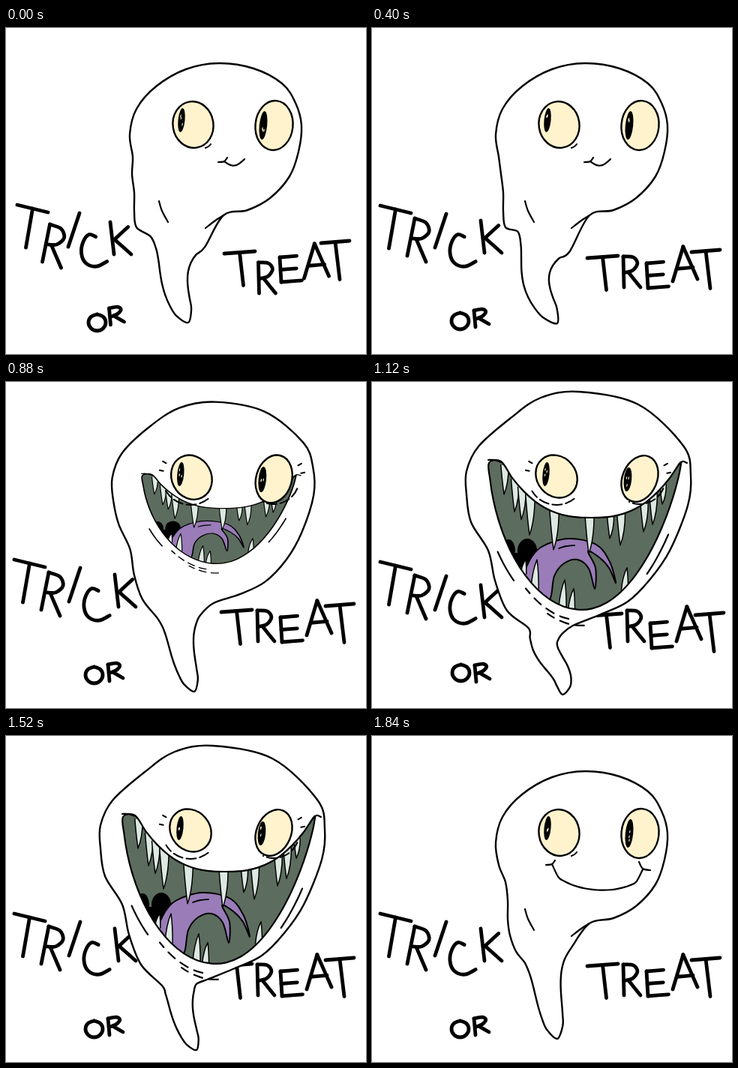
Animation of 480 by 435 pixels, one loop 1.92 s. Source, as an HTML page with a canvas:

```html
<!DOCTYPE html>
<html>
<head>
<meta charset="utf-8">
<title>Trick or treat</title>
<style>
html, body { margin: 0; width: 100%; height: 100%; overflow: hidden; background: #fff; }
canvas { display: block; }
</style>
</head>
<body>
<canvas id="stage" width="480" height="435"></canvas>
<script>
const ctx = document.getElementById('stage').getContext('2d');
const STEP = 80, COUNT = 24, PI = Math.PI;
const INK = '#000', CREAM = '#fff3cd', GUM = '#5c6c5e', PURPLE = '#9a7cb8', TOOTH = '#dde8e2';

const clamp = (v, lo, hi) => Math.max(lo, Math.min(hi, v));
const lerp = (a, b, k) => a + (b - a) * k;
const blend = (a, b, k) => a.map((v, i) => lerp(v, b[i], k));
const range = (n, fn) => Array.from({ length: n + 1 }, (_, i) => fn(i / n, i));
const noise = n => {
  const v = Math.sin(n * 91.7 + 3.1) * 4373.3;
  return v - Math.floor(v) - 0.5;
};
// "x y x y / x y ..." -> list of point lists
const strokes = s => s.split('/').map(part => {
  const n = part.trim().split(/\s+/).map(Number);
  return range(n.length / 2 - 1, (_, i) => [n[2 * i], n[2 * i + 1]]);
});

// Smooth curve through all points
function trace(p, closed) {
  const n = p.length;
  const at = i => closed ? p[(i + n) % n] : p[clamp(i, 0, n - 1)];
  ctx.beginPath();
  ctx.moveTo(...p[0]);
  for (let i = 0; i < (closed ? n : n - 1); i++) {
    const a = at(i - 1), b = at(i), c = at(i + 1), d = at(i + 2);
    ctx.bezierCurveTo(b[0] + (c[0] - a[0]) / 6, b[1] + (c[1] - a[1]) / 6,
      c[0] - (d[0] - b[0]) / 6, c[1] - (d[1] - b[1]) / 6, ...c);
  }
  if (closed) ctx.closePath();
}
function paint(fill, width) {
  if (fill) {
    ctx.fillStyle = fill;
    ctx.fill();
  }
  if (width) {
    ctx.lineWidth = width;
    ctx.stroke();
  }
}
function line(p, width = 2.2) {
  trace(p);
  paint(null, width);
}
function shape(p, fill, width = 2.4) {
  trace(p, true);
  paint(fill, width);
}
function oval(x, y, rx, ry, turn, fill, width) {
  ctx.beginPath();
  ctx.ellipse(x, y, rx, ry, turn, 0, PI * 2);
  paint(fill, width);
}

// Stroke letters in a unit box
const glyphs = {
  T: '0 0 1 0/.5 0 .5 1',
  R: '0 0 0 1/0 0 .6 .02 .85 .22 .55 .45 .1 .52/.3 .52 1 1',
  I: '0 0 0 1',
  C: '.55 .15 .3 .08 .08 .3 .02 .65 .2 .95 .6 1.05 1 .9',
  K: '0 0 0 1/1 .15 .1 .55/.15 .55 1 1',
  O: '.5 0 .15 .15 0 .5 .15 .85 .5 1 .85 .85 1 .5 .85 .15 .5 0',
  E: '0 0 0 1/0 0 .9 0/0 .5 .85 .5/0 1 1.1 1',
  A: '0 1 .42 0/.42 0 1 1/.18 .64 .82 .64'
};
for (const k in glyphs) glyphs[k] = strokes(glyphs[k]);

// Each letter: x, y, width, height, rise, slant; lifts and push move them in the other two drawings
const words = [
  { text: 'TRICK', push: 0, lifts: [[-1, 8, -1, 0, 2], [3, 4, 11, 4, 14]],
    boxes: [[11, 237, 41, 52, 10, -9], [57, 254, 25, 50, 8, -10], [99, 248, 0, 45, 0, -15], [104, 272, 35, 44, 0, -1], [145, 257, 23, 43, 0, 5]] },
  { text: 'OR', push: 1, lifts: [[2, -3], [-3, 1]],
    boxes: [[106, 380, 23, 22, 0, 0], [136, 377, 18, 22, -4, 2]] },
  { text: 'TREAT', push: 5, lifts: [[-6, 8, -8, -4, -12], [5, 0, 8, 8, 12]],
    boxes: [[287, 307, 41, 44, -3, 5], [335, 305, 22, 41, 0, 1], [366, 314, 25, 33, -2, 2], [401, 293, 33, 45, -3, 0], [426, 299, 38, 50, -3, 6]] }
];
function lettering(n) {
  const pose = n % 4;
  for (const { text, push, lifts, boxes } of words) {
    [...text].forEach((c, i) => {
      const [x, y, w, h, rise, slant] = boxes[i];
      const dx = pose === 0 ? 4 - 2.5 * i : pose === 2 ? push : 0;
      const dy = pose % 2 ? 0 : lifts[pose / 2][i];
      glyphs[c].forEach(s => line(s.map(([u, v]) => [x + dx + w * u + slant * v, y + dy + h * v + rise * u]), 4.8));
    });
  }
}

// Head outline from the right of the neck over the top to the left
const calmHead = strokes('290 250 322 243 352 227 378 198 390 165 394 130 386 100 368 74 330 54 284 47 240 55 200 78 174 108 165 142 169 172 175 195 178 220 178 245 181 266')[0];
const wildHead = strokes('268 325 305 310 341 293 371 263 397 225 421 165 425 124 415 85 355 30 276 13 225 21 185 48 142 86 126 119 126 150 132 187 155 225 164 265 180 305')[0];

// Tapered tail around a swaying spine
function tail(open, c, s) {
  const calm = [229, 285, 247 - 4 * c, 399 - 6 * c - 5 * s, -11 - 8 * s, 0];
  const wild = [231, 332, 247 - 7 * c - 7 * s, 417 - 2 * s, 6 * s, 6 * c];
  const [x0, y0, x1, y1, bend, curl] = blend(calm, wild, open);
  const flare = lerp(17, 6, open), base = lerp(14, 11, open);
  const spine = u => [lerp(x0, x1, u) + bend * Math.sin(PI * u) + curl * Math.sin(2 * PI * u), lerp(y0, y1, u)];
  const edge = (u, side) => {
    const [x, y] = spine(u), [nx, ny] = spine(u + 0.01);
    const len = Math.hypot(nx - x, ny - y);
    const w = (base + 6 * (1 - u) + flare * (1 - u) ** 6) * Math.sqrt(1 - u ** 6) * side;
    return [x - w * (ny - y) / len, y + w * (nx - x) / len];
  };
  return [...range(8, u => edge(u, 1)), ...range(7, u => edge((1 - u) * 0.875, -1))];
}
function bodyShape(n, open) {
  const c = Math.cos(n * PI / 2), s = Math.sin(n * PI / 2);
  const head = calmHead.map((p, i) => {
    const sway = i > 14 ? (-7 * c - 3 * s) * (1 - open) : 0;
    const [x, y] = blend(p, wildHead[i], open);
    return [x + sway, y];
  });
  return [...head, ...tail(open, c, s)];
}

// Eyes: x, y, rx, ry, turn
const eyes = [
  { calm: [249.5, 129, 27, 31, -0.15], wild: [246, 126, 26, 30, -0.7], pupil: [234, 123, 4.5, 16], bag: [0.9, 2.6, 38], lash: PI + 0.5 },
  { calm: [357.5, 130, 25, 33, 0.1], wild: [357, 129, 23, 32, 0.4], pupil: [343, 130, 5.2, 19], bag: [0.4, 2, 34], lash: -0.5 }
];
function drawEyes(open, n) {
  eyes.forEach(({ calm, wild, pupil, bag, lash }, i) => {
    oval(...blend(calm, wild, open), CREAM, 2.4);
    const [x, y, rx, ry] = pupil;
    const px = x - 2 * open, h = ry - 3 * open * i;
    oval(px, y, rx, h, 0.1, INK);
    for (let k = 0; k < 3; k++) {
      const fx = px + 3 * noise(n * 7 + k), fy = y + h * noise(n * 5 + k + i * 40);
      oval(fx, fy, 0.6, 2, 0.2, CREAM);
    }
    if (!open) return;
    const [ex, ey] = wild, [from, to, r] = bag;
    ctx.setLineDash([13, 5]);
    ctx.beginPath();
    ctx.arc(ex, ey, r, from, to);
    paint(null, 2);
    ctx.setLineDash([]);
    for (const a of [lash, lash + 0.3 * (i ? 1 : -1)]) {
      const at = d => [ex + d * Math.cos(a), ey + d * Math.sin(a)];
      line([at(37), at(42)], 2);
    }
  });
}

// Mouth edges
const lipY = x => 181 - 75 * Math.abs((x - 292) / 120) ** 2.6;
const jaw = a => {
  const right = Math.cos(a) > 0;
  return [280 + (right ? 132 : 124) * Math.cos(a), 108 + 196 * Math.max(0, Math.sin(a)) ** (right ? 1.56 : 1.15)];
};
const jawAt = x => jaw(Math.acos((x - 280) / (x > 280 ? 132 : 124)));
const maw = [...range(16, u => lerp(172, 411, u)).map(x => [x, lipY(x)]), ...range(20, u => jaw(0.1 + u * (PI - 0.1)))];
const tongue = strokes('203 264 209 240 226 220 262 209 299 217 317 240 325 268 316 248 303 234 288 226 298 248 297 276 289 249 274 237 256 242 243 259 237 290 220 280')[0];

// Fangs: x of the root and length
const upper = [[177, 36], [191, 40], [200, 40], [211, 50], [243, 50], [290, 48], [318, 29], [332, 41], [363, 38], [375, 38], [388, 24]];
const lower = [[202, 18], [217, 36], [254, 35], [266, 27], [337, 27]];

function fang(x, y, len, lean) {
  const w = 2.5 + Math.abs(len) * 0.075;
  ctx.beginPath();
  ctx.moveTo(x - w, y - len * 0.08);
  ctx.quadraticCurveTo(x - w * 0.6, y + len * 0.6, x + lean, y + len);
  ctx.quadraticCurveTo(x + w, y + len * 0.6, x + w, y - len * 0.08);
  paint(TOOTH, 1.5);
}
function drawMaw(open) {
  ctx.save();
  ctx.translate(285, 150);
  ctx.scale(0.5 + open / 2, open);
  ctx.translate(-285, -150);
  ctx.save();
  shape(maw, GUM, 0);
  ctx.clip();
  oval(182, 225, 9, 15, 0, INK);
  oval(207, 225, 13, 16, 0, INK);
  oval(192, 238, 16, 10, 0, INK);
  shape(tongue, PURPLE, 2);
  line([[249, 222], [259, 219], [270, 218]], 1.8);
  upper.forEach(([x, len]) => fang(x, lipY(x), len, -1));
  lower.forEach(([x, len]) => fang(x, jawAt(x)[1], -len, 3));
  ctx.restore();
  shape(maw, null, 2.2);
  line([[155, 104], [163, 104], [172, 107]]);
  line([[409, 110], [414, 106], [420, 108]]);

  // Folds follow the jaw
  const fold = (from, to, dx, dy) => line(range(6, u => {
    const [x, y] = jaw(lerp(from, to, u));
    return [x + dx, y + dy];
  }));
  fold(2.25, 2.5, -13, 10);
  fold(0.65, 0.95, 10, 6);
  ctx.setLineDash([12, 9]);
  fold(1.7, 2.2, -2, 14);
  fold(1.55, 1.95, 0, 21);
  ctx.setLineDash([]);
  ctx.restore();
}

// Smile: left x, y, right x, y, depth, roundness
const smiles = [[291, 178, 318, 175, 7, 1], [263, 178, 346, 178, 13, 0.45], [240, 171, 361, 178, 31, 0.4]];
function drawSmile(grin, [neckX, neckY]) {
  const g = Math.min(1, Math.floor(grin));
  const [x0, y0, x1, y1, depth, round] = blend(smiles[g], smiles[g + 1], grin - g);
  line(range(14, u => [lerp(x0, x1, u), lerp(y0, y1, u) + depth * Math.max(0, Math.sin(PI * u)) ** round]));
  line([[x0 - 8, y0 + 1], [x0, y0], [x0 + 4, y0 - 5]]);
  if (grin) line([[x1 - 5, y1 - 2 - 4 * grin], [x1, y1 - 1], [x1 + 5 * grin, y1 + 1]]);
  line([[266, 160], [270, 158], [273, 155]], 2);
  line([[204, 231], [208, 244], [216, 259]]);
  line([[neckX, neckY], [neckX - 11, neckY + 7], [266, 267]]);
}

function draw(n) {
  const open = clamp(0.6 * Math.min(n - 10, 23 - n), 0, 1);
  const grin = clamp((n - 7) / 2, 0, 2);
  const body = bodyShape(n, open);
  ctx.fillStyle = '#fff';
  ctx.fillRect(0, 0, 480, 435);
  ctx.strokeStyle = INK;
  ctx.lineCap = ctx.lineJoin = 'round';
  lettering(n);
  shape(body, '#fff');
  if (open) drawMaw(open);
  else drawSmile(grin, body[0]);
  drawEyes(open, n);
}

const start = performance.now();
function tick() {
  const t = Math.max(0, performance.now() - start);
  draw(Math.floor(t / STEP) % COUNT);
  requestAnimationFrame(tick);
}
tick();
</script>
</body>
</html>
```
